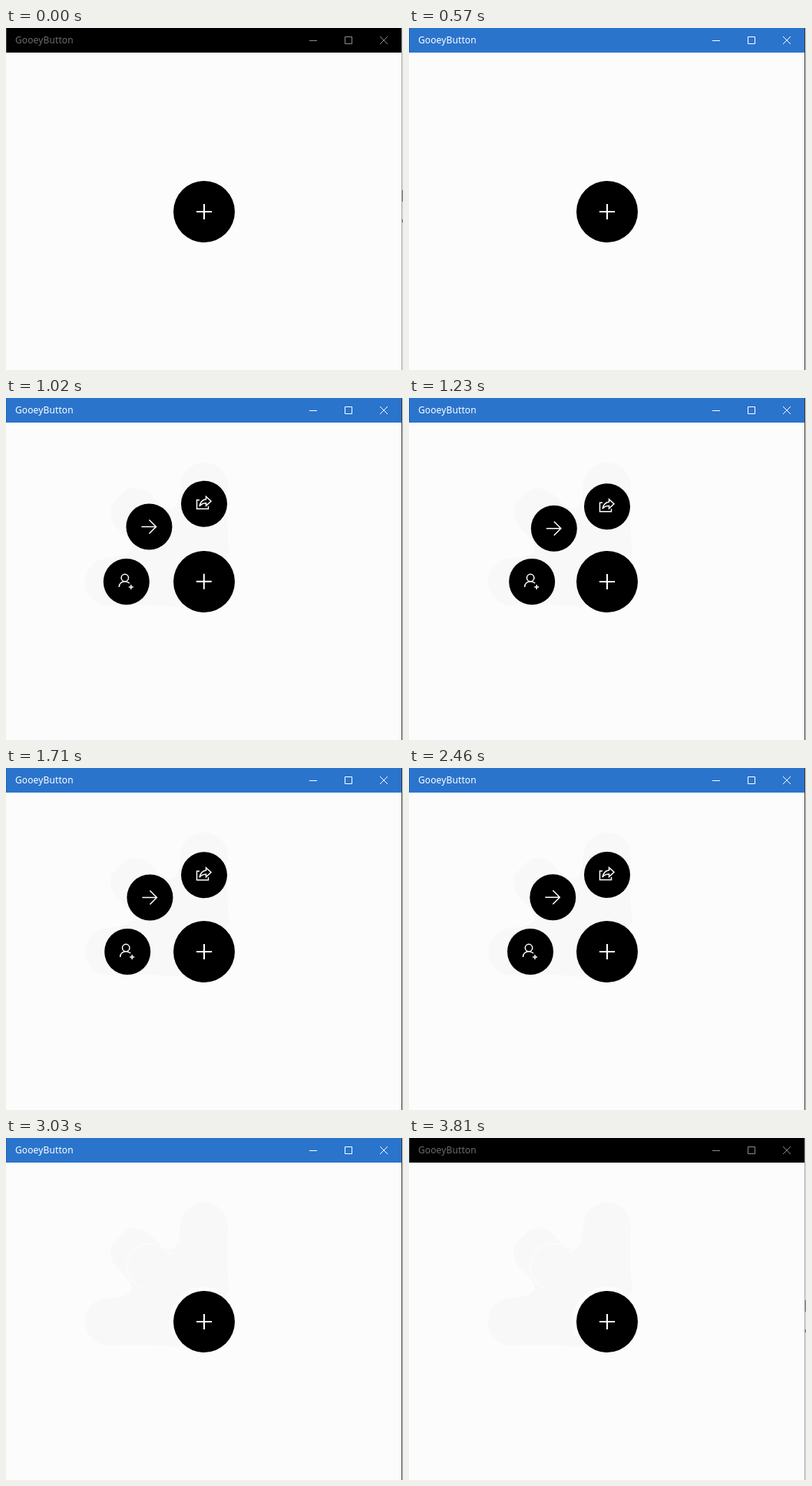
Recreate the animation shown at these times as an HTML page. Size 517 by 445 pixels, loop 3.87 s.

```html
<!DOCTYPE html>
<html lang="en">
<head>
<meta charset="utf-8">
<title>GooeyButton</title>
<style>
  html, body { margin: 0; width: 100%; height: 100%; overflow: hidden; background: #fcfcfc; }
  svg { display: block; width: 517px; height: 445px; }
  text { font: 12px "Noto Sans", "Open Sans", sans-serif; letter-spacing: .12px; }
  .icon { fill: none; stroke: #fff; stroke-width: 1.5; }
  .trace { fill: none; stroke: #fcfcfc; }
  #bar { fill: #2a74cc; }
  #caption { fill: #fff; stroke: none; }
  #controls { fill: none; stroke: #fff; }
  #edge { fill: #333; }
  #rim { fill: #2463b0; }
  #marks { visibility: hidden; }
  .idle #bar { fill: #000; }
  .idle #caption { fill: #6c6c6c; }
  .idle #controls { stroke: #8a8a8a; }
  .idle #edge { fill: #a6a6a6; }
  .idle #rim { fill: #3c3c3c; }
  .idle #marks { visibility: visible; }
</style>
</head>
<body>
<svg id="stage" class="idle" viewBox="0 0 517 445">
  <defs>
    <filter id="goo" filterUnits="userSpaceOnUse" x="60" y="40" width="280" height="280" color-interpolation-filters="sRGB">
      <feGaussianBlur stdDeviation="8"/>
      <feColorMatrix values="1 0 0 0 0  0 1 0 0 0  0 0 1 0 0  0 0 0 40 -20"/>
    </filter>
    <clipPath id="reach"><circle id="reachCircle" cx="258" cy="239" r="0"/></clipPath>
  </defs>

  <rect width="517" height="445" fill="#fcfcfc"/>

  <g clip-path="url(#reach)">
    <path fill="#f8f8f8" d="M258 239L225 272Q185 267 134 270A31 31 0 0 1 134 208L144 207Q162 205 164 196Q163 186 150 174
      A31 31 0 1 1 193 131Q205 144 215 145Q224 143 226 125L227 115A31 31 0 0 1 289 115Q286 160 291 200Z"/>
    <g id="scars" class="trace">
      <path stroke-width="5" d="M219 257A43 43 0 0 1 276 200"/>
      <path stroke-width="1.5" d="M176 195A30 30 0 1 1 216 157"/>
      <path stroke-dasharray="5 7" d="M229 152A30 30 0 0 1 229 130M250 132A30 30 0 0 1 266 132M274 113L279 119
        M129 230A30 30 0 0 0 129 249M152 231A30 30 0 0 0 152 248"/>
    </g>
  </g>

  <g id="blobs" filter="url(#goo)"><circle cx="258" cy="239" r="40"/></g>
  <g id="discs"></g>
  <circle cx="258" cy="239" r="40"/>
  <g id="icons"></g>
  <path id="plus" class="icon" style="stroke-width:2" d="M-10 0H10M0-10V10"/>

  <rect id="bar" width="516" height="32"/>
  <rect id="rim" width="1" height="32"/>
  <text id="caption" x="12" y="20">GooeyButton</text>
  <g id="controls">
    <path d="M395 16.5H405M441.5 11.5H450.5V20.5H441.5Z"/>
    <path d="M487 11L497 21M497 11L487 21"/>
  </g>
  <rect id="edge" x="515" width="1" height="445"/>
  <rect x="516" width="1" height="445" fill="#e4e4e4"/>
  <g id="marks" fill="#8c8c8c">
    <rect x="515" y="211" width="2" height="15"/>
    <rect x="515" y="249" width="2" height="4"/>
  </g>
</svg>
<script>
const LOOP = 3870, STEP = 30;
const ACTIVE = 570, IDLE = 3810;
const OPEN = 620, CLOSE = 2585;
const CX = 258, CY = 239, REST = 100;
const HALF = 250, DAMP = 0.436;   // half period in ms, decay relative to frequency

const items = [
  { angle: 180, path: "M2.7-5A4.7 4.7 0 1 1-6.7-5A4.7 4.7 0 1 1 2.7-5M-9.5 7C-9.5 2-6-.3-2-.3C.5-.3 2.5.6 4 2M3 7H9M6 4V10" },
  { angle: 225, path: "M-10 0H9M0-9L9 0L0 9" },
  { angle: 270, path: "M-6-5H-9.5V6.5H5.5V3M2.5-9.5L9-3.5L2.5 2.5V-1C-1-1-4 0-6 3C-5-2-2-5.5 2.5-6Z" }
];

const $ = id => document.getElementById(id);
const clamp = (v, lo, hi) => Math.min(hi, Math.max(lo, v));

function add(parent, tag, attrs) {
  const el = document.createElementNS("http://www.w3.org/2000/svg", tag);
  for (const key in attrs) el.setAttribute(key, attrs[key]);
  return $(parent).appendChild(el);
}

for (const item of items) {
  const a = item.angle * Math.PI / 180;
  item.dx = Math.cos(a);
  item.dy = Math.sin(a);
  item.blob = add("blobs", "circle", { r: 30 });
  item.disc = add("discs", "circle", { r: 30 });
  item.icon = add("icons", "path", { d: item.path, class: "icon" });
}

// Underdamped step response from 0 to 1
function spring(ms) {
  if (ms <= 0) return 0;
  const p = ms * Math.PI / HALF;
  return 1 - Math.exp(-DAMP * p) * (Math.cos(p) + DAMP * Math.sin(p));
}

const place = (el, x, y) => el.setAttribute("transform", `translate(${x.toFixed(2)} ${y.toFixed(2)})`);

function draw(t) {
  $("stage").classList.toggle("idle", t < ACTIVE || t >= IDLE);

  const raw = REST * (spring(t - OPEN) - spring(t - CLOSE));
  const dist = Math.max(0, raw);
  const alpha = clamp((dist - 8) / 16, 0, 1);
  for (const { dx, dy, blob, disc, icon } of items) {
    const x = CX + dx * dist, y = CY + dy * dist;
    place(blob, x, y);
    place(disc, x, y);
    place(icon, x, y);
    icon.setAttribute("opacity", alpha);
  }

  // The plus leans with the overshoot at either end
  const lean = raw > REST ? (REST - raw) * 0.17 : raw < 0 ? -raw * 0.12 : 0;
  place($("plus"), CX + lean, CY + lean);

  const far = REST * spring(clamp(t - OPEN, 0, HALF));
  $("reachCircle").setAttribute("r", far ? far + 31 : 0);
  $("scars").setAttribute("opacity", t >= CLOSE + 60 ? 1 : 0);
}

const start = performance.now();
function frame() {
  const t = (performance.now() - start) % LOOP;
  draw(Math.floor(t / STEP) * STEP);
  requestAnimationFrame(frame);
}
frame();
</script>
</body>
</html>
```
